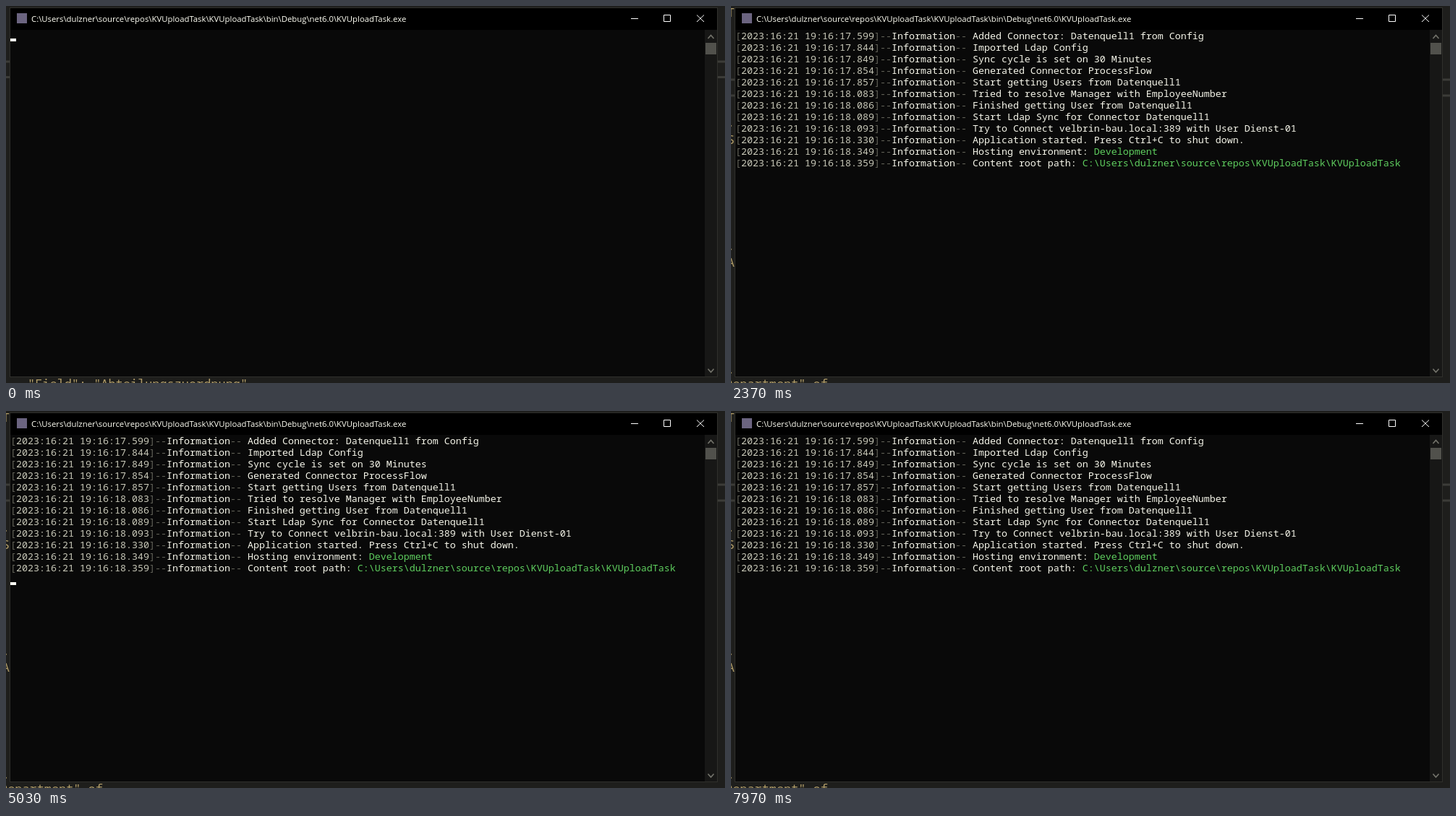
Recreate the animation shown at these times as an HTML page. Size 994 px wide and 522 px high, loop 8000 ms.

```html
<!DOCTYPE html>
<html lang="en">
<head>
<meta charset="utf-8">
<title>Console log</title>
<style>
html, body { margin: 0; width: 100%; height: 100%; overflow: hidden; background: #1e1e1c; }
svg { display: block; width: 994px; height: 522px; }
text { white-space: pre; }
.mono { font: 13.333px "Noto Sans Mono", "DejaVu Sans Mono", monospace; fill: #f6f6ea; }
.title { font: 11.35px "Open Sans", "Noto Sans", sans-serif; fill: #fffff4; }
.code { font: 16.9px "Noto Sans Mono", monospace; fill: #b09c68; }
.dim { fill: #66665c; }
.stamp { fill: #c8c8b8; }
.green { fill: #5fcf5f; }
.rule { stroke: #3c3c38; stroke-width: 3; }
.icon { fill: none; stroke: #fff; }
.arrow { fill: none; stroke: #74746c; stroke-width: 1.6; }
</style>
</head>
<body>
<svg id="stage" viewBox="0 0 994 522"></svg>
<script>
const LOOP = 8000, BLINK = 530, LAST_LINE = 1780, SCROLL = 430;
const ROW = 16, LEFT = 6, TOP = 34;
const APP = "KVUploadTask", ROOT = "C:\\Users\\dulzner\\source\\repos\\" + APP + "\\" + APP;

// seconds, message, highlighted value
const log = [
  [17.599, "Added Connector: Datenquell1 from Config"],
  [17.844, "Imported Ldap Config"],
  [17.849, "Sync cycle is set on 30 Minutes"],
  [17.854, "Generated Connector ProcessFlow"],
  [17.857, "Start getting Users from Datenquell1"],
  [18.083, "Tried to resolve Manager with EmployeeNumber"],
  [18.086, "Finished getting User from Datenquell1"],
  [18.089, "Start Ldap Sync for Connector Datenquell1"],
  [18.093, "Try to Connect velbrin-bau.local:389 with User Dienst-01"],
  [18.330, "Application started. Press Ctrl+C to shut down."],
  [18.349, "Hosting environment: ", "Development"],
  [18.359, "Content root path: ", ROOT]
];
const endStamp = log[log.length - 1][0];
const shownAt = log.map(([s]) => LAST_LINE + (s - endStamp) * 1000);

const span = (cls, s) => `<tspan class="${cls}">${s}</tspan>`;
const rect = (x, y, w, h, fill, more = "") =>
  `<rect x="${x}" y="${y}" width="${w}" height="${h}" fill="${fill}" ${more}/>`;
const path = (cls, d) => `<path class="${cls}" d="${d}"/>`;
const text = (cls, x, y, s, more = "") => `<text class="${cls}" x="${x}" y="${y}" ${more}>${s}</text>`;
const rules = (...ys) => ys.map(y => path("rule", `M0 ${y}H994`)).join("");
const edge = (y, s) => text("code", 5, y, s, 'text-anchor="end"');

const logLine = ([sec, msg, value = ""], i) => text("mono line", LEFT, TOP + 12 + i * ROW,
  span("dim", "[") + span("stamp", "2023:16:21 19:16:" + sec.toFixed(3)) + span("dim", "]--") +
  "Information" + span("dim", "--") + " " + msg + span("green", value));

const stage = document.getElementById("stage");
stage.innerHTML =
  rect(0, 0, 994, 522, "#1e1e1c") +
  `<g id="before">${rules(77, 98.5)}${text("code", 30, 529, '"Field": "Abteilungszuordnung"')}</g>` +
  `<g id="after">${rules(102, 124)}${edge(15, "T")}${edge(167, ".")}${edge(191, "S")}` +
  `${edge(338, ".")}${edge(361, "A")}${edge(509, ".")}${text("code", -8, 529, 'Department" of')}</g>` +
  rect(5.5, 2.5, 978, 511, "#090909", 'stroke="#30302c"') +
  rect(6, 3, 977, 30, "#000") +
  rect(15, 10, 14, 14, "#6b6480") +
  text("title", 35, 22, `${ROOT}\\bin\\Debug\\net6.0\\${APP}.exe`) +
  path("icon", "M864 17.5H874M909.5 12.5H918.5V21.5H909.5ZM955 12.5L965 22M965 12.5L955 22") +
  rect(966, 33, 17, 480, "#171716") +
  rect(967, 51, 15, 16, "#51514c") +
  path("arrow", "M970.5 45L974.5 40.5L978.5 45M970.5 502.5L974.5 507L978.5 502.5") +
  log.map(logLine).join("") +
  rect(LEFT, 0, 8, 4, "#fffff4", 'id="cursor"');

const lines = [...stage.querySelectorAll(".line")];
const [before, after, cursor] = ["before", "after", "cursor"].map(id => document.getElementById(id));
const show = (el, on) => el.setAttribute("visibility", on ? "visible" : "hidden");
const lit = t => Math.floor(t / BLINK) % 2 === 0;

function draw(t) {
  show(before, t < SCROLL);
  show(after, t >= SCROLL);
  lines.forEach((el, i) => show(el, t >= shownAt[i]));
  const row = shownAt.filter(s => t >= s).length;
  cursor.setAttribute("y", TOP + 11 + row * ROW);
  // the last output restarts the blink
  show(cursor, t < LAST_LINE ? lit(t + 80) : lit(t - LAST_LINE));
}

const start = performance.now();
function tick() {
  draw((performance.now() - start) % LOOP);
  requestAnimationFrame(tick);
}
draw(0);
requestAnimationFrame(tick);
</script>
</body>
</html>
```
